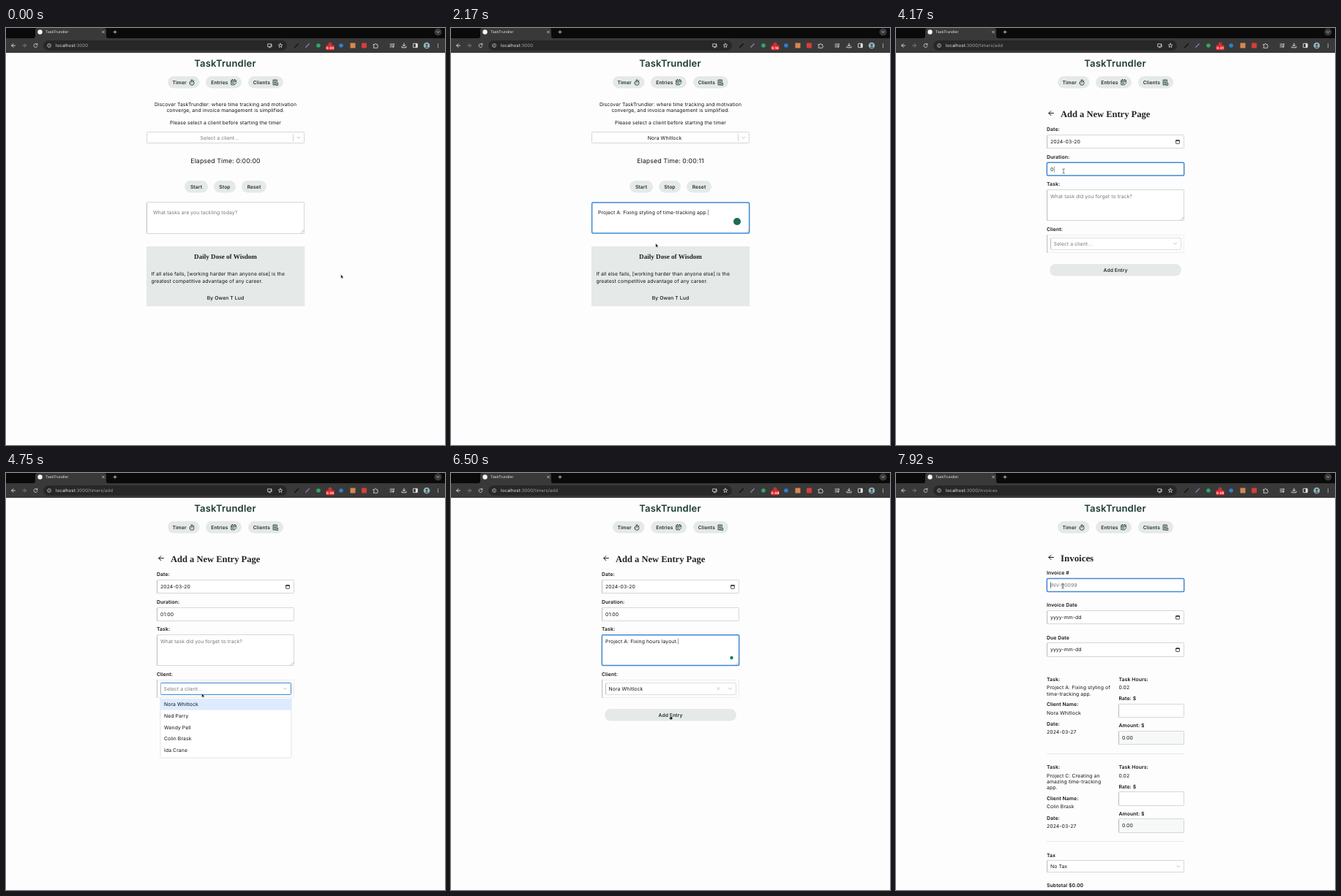
These frames come from a looping animation (600x571 px, 8000 ms). An HTML page:

```html
<!DOCTYPE html>
<html lang="en">
<head>
<meta charset="utf-8">
<title>TaskTrundler</title>
<style>
  html, body { margin: 0; width: 100%; height: 100%; overflow: hidden; background: #fefdfe; }
  svg { display: block; width: 100vw; height: 100vh; }
  text { font-family: Inter, sans-serif; letter-spacing: .015em; white-space: pre; text-rendering: geometricPrecision; }
  .serif { font-family: "Liberation Serif", serif; letter-spacing: 0; }
</style>
</head>
<body>
<svg id="stage" viewBox="0 0 600 571"></svg>
<script>
const LOOP = 8000, STEP = 1000 / 12;
const APP = 'TaskTrundler';
const CLIENTS = ['Nora Whitlock', 'Ned Parry', 'Wendy Pell', 'Colin Brask', 'Ida Crane'];
const [NORA, NED, WENDY, COLIN, IDA] = CLIENTS;
const INK = '#111413', GREEN = '#1c3b35', MIST = '#e5e9e8', GREY = '#747776', LINE = '#d3d7d9', EDGE = '#b3b9ba', BLUE = '#4089cf';

// Drawing helpers; text y is the middle of the line
const text = (x, y, s, o = {}) => {
  const size = o.size || 6.8;
  return `<text x="${x}" y="${y + size * .35}" font-size="${size}" fill="${o.fill || INK}" ` +
    `font-weight="${o.weight || 400}" text-anchor="${o.anchor || 'start'}" class="${o.cls || ''}">${s}</text>`;
};
const mid = (x, y, s, o) => text(x, y, s, { anchor: 'middle', ...o });
const bold = (x, y, s, o) => text(x, y, s, { weight: 600, ...o });
const serif = (x, y, s, size, anchor) => text(x, y, s, { size, anchor, weight: 700, cls: 'serif', fill: '#1f2221' });
const lines = (x, y, arr, gap = 8.4, o) => arr.map((s, i) => text(x, y + i * gap, s, o)).join('');
const centred = (x, y, arr, gap, o) => lines(x, y - (arr.length - 1) * gap / 2, arr, gap, o);
const box = (x1, y1, x2, y2, fill = 'none', stroke = 'none', rx = 0, w = .7) =>
  `<rect x="${x1}" y="${y1}" width="${x2 - x1}" height="${y2 - y1}" rx="${rx}" fill="${fill}" stroke="${stroke}" stroke-width="${w}"/>`;
// One-pixel border on whole pixels
const frame = (x1, y1, x2, y2, fill, stroke = LINE) =>
  box(Math.floor(x1) + .5, Math.floor(y1) + .5, Math.ceil(x2) - .5, Math.ceil(y2) - .5, fill, stroke, .8, 1);
const dot = (x, y, r, fill) => `<circle cx="${x}" cy="${y}" r="${r}" fill="${fill}"/>`;
const path = (x, y, d, stroke = INK, w = .9, fill = 'none') =>
  `<path transform="translate(${x} ${y})" d="${d}" stroke="${stroke}" stroke-width="${w}" fill="${fill}" stroke-linecap="round" stroke-linejoin="round"/>`;
const rule = (x1, x2, y, c = '#d2d6d8') => path(x1, Math.round(y) - .5, `M0 0H${x2 - x1}`, c, 1);
const upright = (x, y, h, c = EDGE) => path(Math.floor(x) + .5, y, `M0 0V${h}`, c, .9);
const pill = (x1, y1, x2, y2, label, dx = 0) => box(x1, y1, x2, y2, MIST, 'none', (y2 - y1) / 2) +
  mid((x1 + x2) / 2 + dx, (y1 + y2) / 2, label, { weight: 600, size: 6.7, fill: '#22302d' });
const field = (x1, y1, x2, y2, focus, fill = '#fff') => focus
  ? box(x1 + .3, y1 + .2, x2 - .3, y2 - .2, fill, BLUE, 1.5, 1.5)
  : frame(x1, y1, x2, y2, fill) + upright(x1, y1 + 1, y2 - y1 - 1.5);
const grip = (x, y) => path(x, y, 'M-4 0L0-4M-2 0L0-2', '#999', .5);
const chevron = (x, y) => path(x, y, 'M-2-1L0 1L2-1', '#b9bcbd', .9);
const calendar = (x, y) => box(x - 2.4, y - 2.2, x + 2.4, y + 2.5, 'none', '#222', .5, .8) + path(x, y - 1.6, 'M-2.2 0H2.2', '#222', 1.3);
const caret = (x, y) => path(x, y, 'M0-3.8V3.8', '#111', .6);
const backArrow = (x, y) => path(x, y, 'M3.4 0H-3.2M-.2-3L-3.2 0L-.2 3', INK, 1);
const CARET = '<tspan font-weight="300">|</tspan>';

// Time helpers
const clamp = v => Math.max(0, Math.min(1, v));
const typed = (s, t, a, b) => s.slice(0, Math.round(s.length * clamp((t - a) / (b - a))));
const during = (t, a, b) => t >= a && t < b;
const two = n => String(n).padStart(2, '0');
function track(keys, t) {
  let i = 0;
  while (i < keys.length - 2 && t >= keys[i + 1][0]) i++;
  const a = keys[i], b = keys[i + 1], p = clamp((t - a[0]) / (b[0] - a[0]));
  return { i, at: n => a[n] + (b[n] - a[n]) * p };
}

const BADGE = [[0, 0], [.83, 6], [3.08, 22], [4.17, 31], [5.58, 42], [7.17, 53], [7.92, 58]];

function chrome(t, url) {
  const icon = '#e3e3e3', bar = '#393939', c = Math.round(track(BADGE, t).at(1));
  return box(0, 0, 600, 14, '#0a0a0a') + box(0, 14, 600, 34, bar) +
    path(37, 14, 'M0 0Q3 0 3-3V-11Q3-14 6-14H97Q100-14 100-11V-3Q100 0 103 0Z', 'none', 0, bar) +
    dot(46.5, 5.5, 3.2, '#f4f4f4') + text(54, 5.5, APP, { size: 5, fill: '#eee' }) +
    path(133, 5.5, 'M-1.5-1.5L1.5 1.5M1.5-1.5L-1.5 1.5', icon, .7) + path(149, 5.5, 'M-2 0H2M0-2V2', icon, .8) +
    dot(590.5, 5.5, 5, bar) + path(590.5, 5.5, 'M-1.6-.8L0 .8L1.6-.8', icon, .8) +
    path(10, 24, 'M2.4 0H-2.4M0-2.4L-2.4 0L0 2.4', icon) + path(25, 24, 'M-2.4 0H2.4M0-2.4L2.4 0L0 2.4', '#858585') +
    path(40.5, 24, 'M2-1.5A2.5 2.5 0 1 0 2.4 .8M2.3-2.8V-1.1H.6', icon, .8) +
    box(51, 17, 384, 31, '#272727', 'none', 7) +
    path(59, 24, 'M-2.5 0A2.5 2.5 0 1 0 2.5 0A2.5 2.5 0 1 0-2.5 0M0-.2V1.2M0-1.3V-1.2', '#d0d0d0', .7) +
    text(68, 24, `localhost:<tspan fill="#a2a2a2">3000${url}</tspan>`, { size: 6.05, fill: '#eee' }) +
    path(360.5, 24, 'M.5-2.2H-2.8V1.6H2.8V.8M-1 2.8H1M2-2.5V0M.9-1L2 .1L3.1-1', icon, .8) +
    path(375, 24, 'M0-2.9L.8-1L2.9-.9L1.2 .5L1.8 2.5L0 1.4L-1.8 2.5L-1.2 .5L-2.9-.9L-.8-1Z', icon, .7) +
    path(397, 24, 'M-2.3 2.4L2.3-2.2', '#111', 1.4) + path(412, 24, 'M-2.3 2.3L2.3-2.3', '#a383d3', 1.2) +
    dot(427, 24, 2.8, '#2fa866') + dot(443, 22, 2.6, '#b33a3a') + box(437.2, 23.6, 448.8, 30.2, '#e5272d', 'none', 1.5) +
    mid(443, 27, `0:${two(c)}`, { size: 4.5, weight: 700, fill: '#fff' }) +
    dot(458, 24, 2.8, '#2f7fd0') + box(470.5, 20.5, 477.5, 27.5, '#d5884f') + box(486, 20.5, 493, 27.5, '#d93d38', 'none', 1) +
    path(505, 24.3, 'M-2.7-1.8H-1A1 1 0 1 1 1-1.8H2.6V0A1 1 0 1 1 2.6 2V3H-2.7V1.6A1 1 0 1 0-2.7-.4Z', icon, .8) +
    path(528, 24, 'M-3-2H2.6M-3 0H.4M-3 2H-.8M2 1.6V-2', icon, .8) + dot(529.2, 25.8, 1, icon) +
    path(544, 24, 'M0-3V.8M-1.7-.8L0 .9L1.7-.8M-3 1.2V2.8H3V1.2', icon, .9) +
    box(556.5, 21.3, 562.3, 26.7, 'none', icon, .5, .9) + box(559.8, 21.3, 562.3, 26.7, icon) +
    dot(575, 24, 4.3, '#8fb8c4') + dot(575, 23, 1.5, '#4c4038') + path(575, 24, 'M-2.4 3Q0-.5 2.4 3Z', 'none', 0, '#4c4038') +
    [-2.2, 0, 2.2].map(d => dot(590.5, 24 + d, .65, icon)).join('');
}

function header() {
  return mid(299.5, 48.5, APP, { size: 13, weight: 600, fill: GREEN }) +
    pill(221, 66, 264.5, 82.5, 'Timer', -5.6) + pill(273, 66, 322, 82.5, 'Entries', -5.6) + pill(331, 66, 379, 82.5, 'Clients', -5.6) +
    path(254, 75, 'M-3 .3A3 3 0 1 0 3 .3A3 3 0 1 0-3 .3M0 .3V-1.3M-1-4H1M2.4-2.4L3-3', GREEN, .9) +
    path(311, 74.5, 'M1 3.2H-3.2V-3H3.3V-.8M-3.2-1H3.2M-1.5-4V-3M1.6-4V-3M-1.6 1H.4M1 3.3L3.8 .4', GREEN, .9) +
    path(368, 74.5, 'M.3 3.4H-2.9V-3.5H2.3V-.6M-1.4-1.7H.9M-1.4 0H.5M-1.4 1.7H-.5M1 3.4V.8H3.6V3.4Z', GREEN, .9);
}

function menu(x1, x2, y, hover, centre) {
  const h = 15.7;
  return box(x1, y, x2, y + 83, '#fff', '#d9d9d9', 1.8) +
    box(x1, y + 2 + hover * h, x2, y + 2 + (hover + 1) * h, '#deebff') +
    CLIENTS.map((c, i) => text(centre ? (x1 + x2) / 2 : x1 + 5, y + 2 + h * (i + .5), c, { anchor: centre ? 'middle' : 'start' })).join('');
}

function timerPage(t) {
  const open = during(t, .24, .49), picked = t >= .49, focus = during(t, .74, 2.41);
  const secs = Math.max(0, Math.floor((Math.min(t, 2.58) - .55) * 7.3));
  const task = typed('Project A: Fixing styling of time-tracking app.', t, .9, 2.1);
  return mid(300, 104.2, `Discover ${APP}: where time tracking and motivation`) +
    mid(300, 112.6, 'converge, and invoice management is simplified.') +
    mid(300, 129.3, 'Please select a client before starting the timer') +
    frame(192, 142, 408, 158, '#fff', open ? BLUE : LINE) + upright(392, 145.5, 9, '#ccc') + chevron(400, 150.2) +
    mid(292, 150.3, picked ? NORA : 'Select a client...', { fill: picked ? INK : GREY }) +
    mid(300, 182, `Elapsed Time: 0:00:${two(secs)}`, { size: 8.7 }) +
    pill(244, 209, 276, 225.5, 'Start') + pill(284, 209, 314, 225.5, 'Stop') + pill(322, 209, 356, 225.5, 'Reset') +
    field(192.3, 238.7, 408, 281.3, focus) + grip(407, 280.3) +
    (task ? text(201, 252.3, task + (focus ? CARET : '')) : text(201, 252.3, 'What tasks are you tackling today?', { fill: GREY }) + (focus ? caret(201.6, 252.5) : '')) +
    (focus ? dot(391, 265, 5, '#1d6b57') : '') +
    box(192, 299, 408.3, 381, MIST) + serif(300, 312.7, 'Daily Dose of Wisdom', 9.1, 'middle') +
    lines(198.5, 337, ['If all else fails, [working harder than anyone else] is the', 'greatest competitive advantage of any career.'], 9.4) +
    mid(300, 369.8, 'By Owen T Lud', { weight: 500 }) +
    (open ? menu(192.5, 408, 161.5, 0, true) : '');
}

// date, start, end, duration, task lines, client, invoiced
const ROWS = [
  ['2024-03-27', '16:43:44', '16:44:00', '00:01', 'Project A:|Fixing styling|of time-|tracking app.', NORA, false],
  ['2024-03-27', '16:40:52', '16:41:10', '00:01', 'Project C:|Creating an|amazing|time-|tracking app.', COLIN, true],
  ['2024-03-22', '00:00:00', '01:00:00', '01:00', 'Project A:|Fixing styling|on mobile|view.', IDA, false],
  ['2024-03-20', '00:00:00', '01:00:00', '01:00', 'Project A:|Finalizing|styling|touches of|app.', IDA, true],
  ['2024-02-05', '14:00:00', '16:00:00', '02:00', 'Finalizing|deployment|for Project E', COLIN, true],
  ['2024-02-04', '10:15:00', '12:45:00', '02:30', 'Client review|meeting for|Project D', COLIN, true],
  ['2024-02-03', '13:00:00', '15:30:00', '02:30', 'Design|phase for|Project C', WENDY, true],
  ['2024-02-02', '09:30:00', '11:45:00', '02:15', 'Initial|development|work on|Project B', NED, false]
];
const ADDED = ['2024-03-20', '00:00:00', '01:00:00', '01:00', 'Project A:|Fixing hours|layout.', NORA, false];

function tableRow(r, y, checked, hover) {
  const [date, start, end, length, task, client, invoiced] = r;
  const words = invoiced ? ['Mark as', 'Not', 'Invoiced'] : ['Mark as', 'Invoiced'], h = words.length * 4.1 + .3;
  return box(97.4, y - 2.2, 103, y + 3.4, checked ? '#2374e1' : '#fff', checked ? '#2374e1' : '#888', 1, .7) +
    (checked ? path(100.2, y + .6, 'M-1.6 0L-.4 1.3L1.7-1.3', '#fff', .9) : '') +
    text(115, y, date) + text(163.3, y, start) + text(211.2, y, end) + text(263, y, length) +
    centred(311.3, y + .3, task.split('|'), 8.4) +
    centred(361, y, client === NORA ? client.split(' ') : [client], 8.4) +
    text(410, y, invoiced ? 'Invoiced' : 'Not Invoiced') +
    box(463.5, y - h, 491, y + h, hover ? '#d8dddc' : MIST, 'none', Math.min(h, 12)) +
    centred(477.2, y - .2, words, 6.5, { size: 5.3, weight: 500, anchor: 'middle' }) +
    path(501.3, y - .8, 'M-2.3-2.4V3.6H2.3V-2.4M-3-2.5H3M-1-3.6H1', '#d8452f', 1);
}

function entriesPage(t) {
  const late = t > 6, rows = late ? [...ROWS.slice(0, 4), ADDED, ...ROWS.slice(4)] : ROWS;
  let y = 201, out = '';
  rows.forEach((r, i) => {
    const h = r[6] ? 50 : 43.5;
    const checked = late && ((i === 0 && t > 6.9) || (i === 1 && t > 6.98));
    out += tableRow(r, y + h / 2 + 4, checked, i === 0 && during(t, 7.1, 7.3));
    y += h;
    out += rule(89, 511, y);
  });
  const heads = ['Date', 'Start', 'End', 'Duration', 'Task', 'Client Name', '', 'Actions'];
  return serif(300, 116, 'Time Entries', 11.1, 'middle') +
    mid(300, 135.3, 'You rock - here are all the time entries you have done!') +
    pill(93.5, 150.5, 158, 167, 'Add New Entry') + pill(444, 150.5, 507, 167, 'Create Invoice') +
    out + box(89, 180, 511, 205, MIST) +
    heads.map((s, i) => text(119.3 + i * 47.95, 192.3, s, { weight: 500 })).join('') +
    lines(407, 188.2, ['Billing', 'Status'], 8.4, { weight: 500 });
}

function addPage(t) {
  const x = 206, tx = 211, onDate = during(t, 3.72, 4.06), onLength = during(t, 4.06, 4.73), onTask = during(t, 5.15, 6.55);
  const open = during(t, 4.73, 4.98), picked = t >= 4.98;
  const n = typed('2024-03-20', t, 3.72, 4).length, date = '2024-03-20'.slice(0, n) + 'yyyy-mm-dd'.slice(n);
  const length = typed('01:00', t, 4.1, 4.5), task = typed('Project A: Fixing hours layout.', t, 5.25, 6.19);
  return backArrow(212, 116.7) + serif(225, 118, 'Add a New Entry Page', 12.5) +
    bold(x, 139, 'Date:') + field(x, 146.5, 394, 165, onDate) + text(tx, 155.7, date) + calendar(385, 155.8) +
    bold(x, 176.7, 'Duration:') + field(x, 184, 394, 202.3, onLength) + text(tx, 193.3, length + (onLength ? CARET : '')) +
    bold(x, 214, 'Task:') + field(x, 221.5, 394, 263.7, onTask) + grip(393, 262.7) +
    (task ? text(tx, 230.3, task + (onTask ? CARET : '')) : text(tx, 230.3, 'What task did you forget to track?', { fill: GREY }) + (onTask ? caret(tx + .5, 230.3) : '')) +
    (onTask ? dot(383.5, 253, 2.2, '#147a60') : '') +
    bold(x, 275.2, 'Client:') + frame(x, 283, 394, 308, 'none', '#eceeee') + upright(x, 283.5, 24) +
    frame(211, 287, 390, 304, '#fff', open ? BLUE : '#dcdfe0') + upright(211, 288.5, 14) + chevron(381.5, 295.3) +
    (picked ? path(365.5, 295.3, 'M-1.6-1.6L1.6 1.6M1.6-1.6L-1.6 1.6', '#b9bcbd', .8) : '') +
    text(215.5, 295.5, picked ? NORA : 'Select a client...', { fill: picked ? INK : GREY }) +
    pill(210, 323, 390, 339.6, 'Add Entry') + (open ? menu(211, 390, 307, 0) : '');
}

function invoiceTask(y, desc, client) {
  const x = 206, rx = 304.5, d = (desc.length - 2) * 8.4;
  return bold(x, y, 'Task:') + lines(x, y + 11.3, desc) +
    bold(x, y + 34.6 + d, 'Client Name:') + text(x, y + 45.7 + d, client) +
    bold(x, y + 61 + d, 'Date:') + text(x, y + 72.2 + d, '2024-03-27') +
    bold(rx, y, 'Task Hours:') + text(rx, y + 11.3, '0.02') +
    bold(rx, y + 26.4, 'Rate: $') + field(rx - .3, y + 33.8, 394, y + 52.2) +
    bold(rx, y + 63.6, 'Amount: $') + field(rx - .3, y + 70.8, 394, y + 89.5, false, '#f7f8f8') + text(309, y + 80.2, '0.00') +
    rule(x, 394, y + 102.5, '#e8eaea');
}

function invoicePage(t) {
  const x = 206, tx = 211, focus = t > 7.8;
  const date = (y, label) => bold(x, y, label) + field(x, y + 7.2, 394, y + 26) + text(tx, y + 16.8, 'yyyy-mm-dd') + calendar(385, y + 16.8);
  return backArrow(212, 115.5) + serif(225, 116.3, 'Invoices', 12.9) +
    bold(x, 137, 'Invoice #') + field(x, 144.3, 394, 162.7, focus) + text(tx, 153.5, 'INV-00099', { fill: GREY }) +
    (focus ? caret(tx + .4, 153.5) : '') + date(180.9, 'Invoice Date') + date(225.2, 'Due Date') +
    invoiceTask(282.5, ['Project A: Fixing styling of', 'time-tracking app.'], NORA) +
    invoiceTask(402.9, ['Project C: Creating an', 'amazing time-tracking', 'app.'], COLIN) +
    bold(x, 523.5, 'Tax') + field(x, 530, 394, 547) + text(tx, 538.7, 'No Tax') + chevron(386, 538.7) +
    bold(x, 564.5, 'Subtotal $0.00');
}

// time, x, y, shape: a arrow, i text beam, h hand, '' hidden
const MOUSE = [
  [0, 457.7, 337.5, 'a'], [.06, 457.7, 337.5, 'a'], [.24, 300, 150, 'a'], [.32, 298, 172, 'h'], [.47, 296, 172, 'a'],
  [.56, 260, 218, 'h'], [.62, 260, 218, 'a'], [.75, 249, 254, 'i'], [.92, 249, 254, 'i'], [1.3, 262, 338, 'a'],
  [2, 266, 350, 'a'], [2.4, 299, 218, 'h'], [2.6, 299, 218, 'a'], [2.75, 297, 75, 'h'], [2.9, 297, 75, 'a'],
  [3.05, 313, 213, 'i'], [3.15, 313, 213, 'a'], [3.45, 126, 159, 'h'], [3.57, 126, 159, 'a'], [3.72, 228, 157, 'i'],
  [3.98, 228, 157, 'i'], [4.08, 229, 196, 'i'], [4.55, 229, 196, 'i'], [4.72, 270, 296, 'a'], [4.82, 262, 316, 'h'],
  [4.99, 262, 316, 'a'], [5.15, 260, 238, 'i'], [5.28, 260, 238, ''], [6.3, 262, 240, 'a'], [6.5, 300, 332, 'h'],
  [6.74, 300, 332, 'a'], [6.9, 100, 227, 'a'], [6.99, 100, 273, 'a'], [7.15, 476, 230, 'h'], [7.25, 476, 230, 'a'],
  [7.4, 475, 159, 'h'], [7.5, 475, 159, 'a'], [7.8, 228, 155, 'i'], [8, 228, 155, 'i']
];
function mouse(t) {
  const m = track(MOUSE, t), x = m.at(1), y = m.at(2);
  switch (MOUSE[m.i][3]) {
    case 'a': return path(x, y, 'M0 0V5.2L1.2 4.2L2 6L2.9 5.6L2.1 3.9H3.7Z', '#fff', .4, '#111');
    case 'i': return path(x, y, 'M-1.4-3.2Q0-3.2 0-2.2V2.2Q0 3.2-1.4 3.2M1.4-3.2Q0-3.2 0-2.2M0 2.2Q0 3.2 1.4 3.2', '#333', .6);
    case 'h': return path(x, y, 'M-.5-.5Q0-1 .5-.4V1.8L2.6 2.4Q3 4 2.2 5.6H-.6L-2 3.2Q-1.8 2.6-.5 3.4Z', '#fff', .4, '#111');
  }
  return '';
}

const PAGES = [
  [0, '', timerPage], [2.9, '/timers', entriesPage], [3.56, '/timers/add', addPage],
  [6.73, '/timers', entriesPage], [7.49, '/invoices', invoicePage]
];
function scene(t) {
  const [, url, page] = PAGES.filter(p => t >= p[0]).pop();
  return box(0, 0, 600, 571, '#fefdfe') + header() + page(t) + chrome(t, url) + mouse(t);
}

const stage = document.getElementById('stage'), began = performance.now();
let shown = -1;
function tick() {
  const ms = (performance.now() - began) % LOOP;
  const step = Math.floor((ms + 4) / STEP) % 96;
  if (step !== shown) stage.innerHTML = scene((shown = step) / 12);
  requestAnimationFrame(tick);
}
tick();
</script>
</body>
</html>
```
